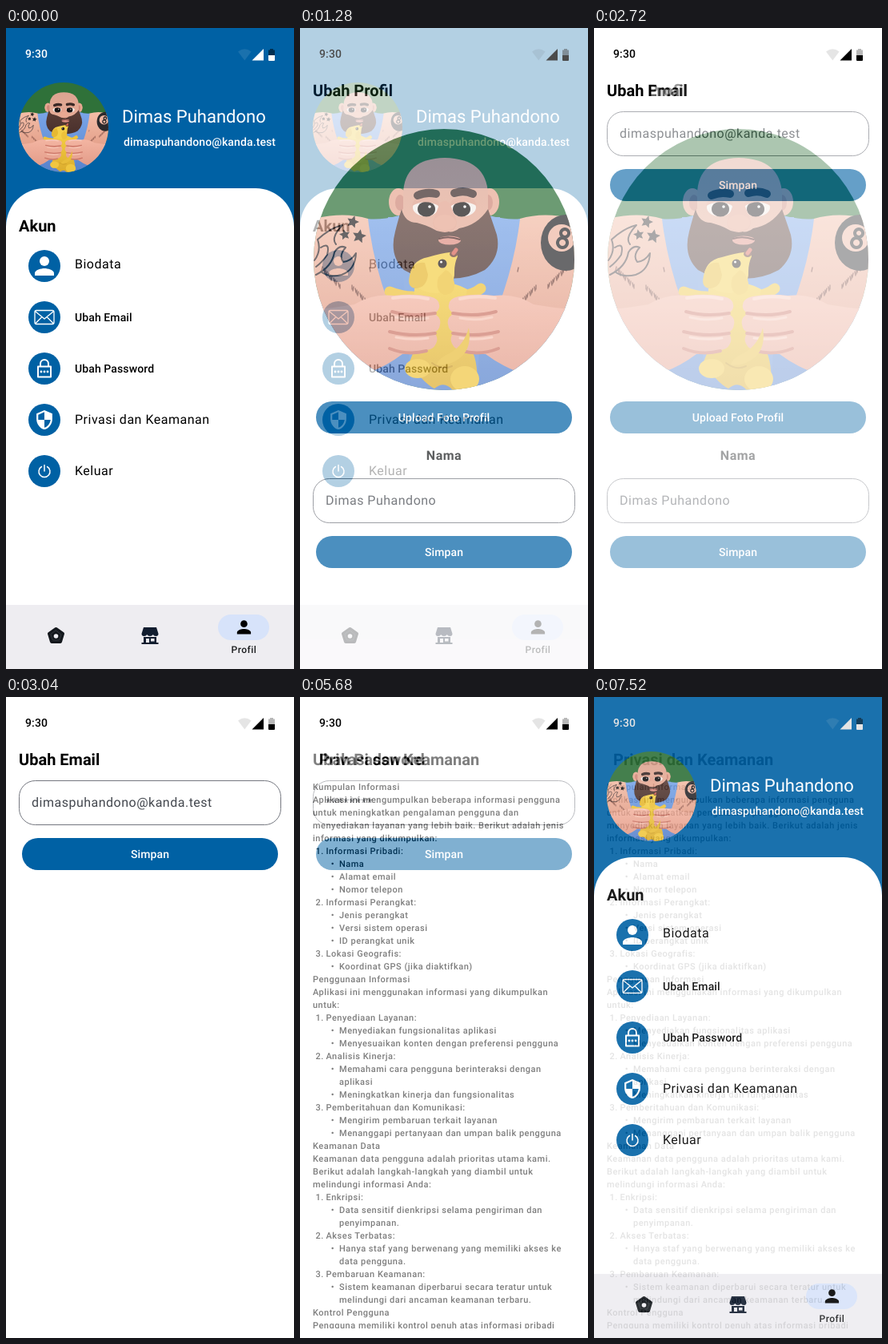
These frames come from a looping animation (360x800 px, 7.6 s). An HTML page:

```html
<!DOCTYPE html>
<html lang="id">
<head>
<meta charset="utf-8">
<title>Profil</title>
<style>
html, body { margin: 0; width: 100%; height: 100%; overflow: hidden; background: #fff; }
svg { display: block; font-family: Roboto, sans-serif; text-rendering: geometricPrecision; }
</style>
</head>
<body>
<svg id="stage" width="360" height="800" viewBox="0 0 360 800"></svg>
<script>
const BLUE = '#0061a4', INK = '#1a1c1e', HOLD = 800, STEP = 80, PERIOD = 1520;
const NAME = 'Dimas Puhandono', EMAIL = 'dimaspuhandono@kanda.test';

const text = (x, y, s, size, weight = 400, gap = 0, fill = '#000', anchor = 'start') =>
  `<text x="${x}" y="${y}" font-size="${size}" font-weight="${weight}" letter-spacing="${gap}" fill="${fill}" text-anchor="${anchor}">${s}</text>`;
const path = (d, fill, extra = '') => `<path d="${d}" fill="${fill}" ${extra}/>`;
const line = (d, color, width, extra = '') =>
  path(d, 'none', `stroke="${color}" stroke-width="${width}" stroke-linecap="round" stroke-linejoin="round" ${extra}`);
const oval = (x, y, rx, ry, fill, extra = '') =>
  `<ellipse cx="${x}" cy="${y}" rx="${rx}" ry="${ry}" fill="${fill}" ${extra}/>`;
const dot = (x, y, r, fill) => oval(x, y, r, r, fill);
const rect = (x, y, w, h, fill, rx = 0, extra = '') =>
  `<rect x="${x}" y="${y}" width="${w}" height="${h}" rx="${rx}" fill="${fill}" ${extra}/>`;
const group = (attrs, body) => `<g ${attrs}>${body}</g>`;
const range = (n, f) => Array.from({ length: n }, (_, i) => f(i)).join('');
const mirror = body => body + group('transform="translate(360 0) scale(-1 1)"', body);

const title = (x, s) => text(x, 85, s, 20, 700);
const button = (y, s) => rect(20, y, 320, 40, BLUE, 20) + text(180, y + 25, s, 14, 500, .1, '#fff', 'middle');
const field = (y, s) => rect(16.5, y + .5, 327, 55, '#fff', 20, 'stroke="#74777f"') + text(32, y + 33, s, 16, 400, .5, '#43474e');

const statusBar = (color, cap) => text(24, 37, '9:30', 14, 500, .14, color) +
  path('M298.3 40.5L290 29.6Q298.3 23 306.6 29.6Z', color, 'opacity=".1"') +
  path('M307.5 40.5L322 26V40.5Z', color) +
  path('M330 26h4v1.5h2v6.5h-8v-6.5h2z', cap) +
  path('M328 34h8v6q0 1-1 1h-6q-1 0-1-1z', color);

const person = fill => dot(12, 8, 4, fill) + path('M12 14c-2.67 0-8 1.34-8 4v2h16v-2c0-2.66-5.33-4-8-4z', fill);

function star(x, y, r, turn) {
  const pts = range(10, i => {
    const a = turn + i * Math.PI / 5, q = i % 2 ? r * .48 : r;
    return `${x + q * Math.sin(a)},${y - q * Math.cos(a)} `;
  });
  return `<polygon points="${pts}" fill="#2b2627"/>`;
}

function portrait() {
  const hand = path('M10 352Q40 350 68 345Q90 331 118 334Q140 331 162 335Q176 338 174 349Q173 354 167 356Q177 361 175 370Q174 378 167 380Q174 386 170 394Q166 403 154 402Q142 407 128 407Q108 422 88 429Q60 432 10 400Z', 'url(#hand)') +
    line('M116 337Q140 333 160 338', '#f9cbbc', 4) +
    line('M169 356Q140 361 115 354M169 381Q140 386 112 379M158 403Q134 409 112 400', '#cc7768', 4) +
    line('M160 362Q140 366 120 361M160 387Q140 390 120 386', '#f7c6b6', 3);
  const shoulder = path('M10 240Q52 228 85 238Q91 290 110 342L60 354L10 354Z', 'url(#skin)');
  const strap = path('M84 238Q101 240 124 234L140 460H78Q92 370 84 238Z', 'url(#denim)');
  const hairs = line(range(24, i => `M${28 + i * 37 % 72} ${298 + i * 23 % 44}l${i % 3 - 1} 5`), '#7a4a40', 1.3);
  const ear = oval(123, 217, 12, 17, '#e7a892') + oval(125, 218, 6, 10, '#cf8878');
  const body = rect(10, 340, 340, 120, 'url(#denim)') + rect(110, 236, 140, 150, '#6f99dc') +
    mirror(strap + shoulder + hairs) +
    line('M18 290Q27 278 22 264Q37 250 53 246Q38 262 45 270M20 308Q40 298 43 280Q49 270 57 274Q48 284 54 292Q64 291 70 281Q69 302 52 308Q36 312 26 304M26 274Q38 266 34 283Q28 292 20 298', '#393033', 2) +
    star(66, 242, 8, .3) + star(56, 258, 7, -.2) + star(74, 260, 9, .2) +
    oval(332, 268, 31, 35, '#2b2a2d') + dot(327, 262, 17, '#efb7a3') +
    line('M331 251a5 5 0 1 0 .1 0M328 262a6 6 0 1 0 .1 0', '#2b2a2d', 4);
  const head = mirror(ear) +
    path('M129 240V207Q130 163 181 162Q233 163 235 207V240Q231 280 182 280Q132 280 129 240Z', 'url(#face)') +
    path('M127 226Q131 243 146 243Q158 246 167 251Q174 256 182 253Q190 257 199 250Q222 246 235 226Q240 240 246 258Q252 284 231 302Q209 314 182 313Q151 315 130 302Q111 284 119 254Q123 238 127 226Z', 'url(#beard)') +
    oval(157, 224, 16, 11, '#f5eeea') + oval(204, 224, 16, 11, '#f5eeea') +
    oval(158, 226, 11, 9.5, '#161314') + oval(202, 226, 11, 9.5, '#161314') +
    path('M140 222Q142 209 158 211Q174 211 175 223Q158 212 140 222ZM187 223Q188 211 204 211Q219 210 221 222Q204 212 187 223Z', '#dfa08c') +
    dot(162, 223, 1.8, '#fff') + dot(206, 223, 1.8, '#fff') +
    line('M147 209Q158 204 170 207M193 206Q205 202 216 207', '#3b2927', 10) +
    path('M175 218Q181 214 187 218L195 238Q198 251 188 253Q181 257 174 253Q164 251 167 239Z', '#e3a38f') +
    oval(181, 243, 14, 10, '#e8a993') + oval(187, 265, 14, 5.5, '#df8f83') +
    line('M174 263Q186 259 200 264', '#4b2926', 2);
  const dog = line('M141 335Q126 335 112 329M201 335Q218 332 226 325', '#eec33a', 13) +
    path('M143 325Q178 309 209 326Q202 362 207 389Q226 412 220 456H194Q182 438 168 450Q160 446 151 436Q134 437 132 425Q149 400 141 370Z', 'url(#dog)') +
    path('M137 313Q138 290 160 286Q177 281 187 280Q195 278 197 285Q193 294 193 304Q194 323 172 331Q148 331 137 313Z', '#f4cf48') +
    path('M156 293Q142 291 138 306Q132 324 145 325Q158 324 160 308Z', '#e7b932') +
    path('M173 311Q168 328 180 333Q194 333 193 318Q190 304 182 302Z', '#edc23b') +
    dot(178, 294, 5.5, '#211919') + dot(176.5, 292, 1.5, '#fff') +
    oval(192, 282, 5, 4, '#693a30') + line('M195 277l-3 4', '#d86558', 5) +
    oval(147, 425, 16, 12, '#f0c640') + oval(206, 438, 18, 16, '#f0c640') +
    line('M165 418Q178 428 190 422', '#c99a28', 2);
  const tail = path('M211 374Q205 396 187 406Q173 412 171 420Q186 423 201 411Q215 399 211 374Z', '#e9bd3a');
  return `<defs>
    <clipPath id="disc"><circle cx="180" cy="289" r="163"/></clipPath>
    <clipPath id="page"><rect width="360" height="788"/></clipPath>` +
    [['skin', '#f3bda7', '#e4a18b'], ['hand', '#f3b5a2', '#e39c89'], ['face', '#dca491', '#e9ae98'],
     ['beard', '#5b3e37', '#49302c'], ['dog', '#f3cd43', '#dbab2d'], ['denim', '#79a5e8', '#5681cb']]
      .map(([id, a, b]) => `<linearGradient id="${id}" x2="0" y2="1"><stop stop-color="${a}"/><stop offset="1" stop-color="${b}"/></linearGradient>`).join('') +
    `<g id="portrait" clip-path="url(#disc)">${rect(10, 120, 340, 340, '#2f7139') + body + head + dog + mirror(hand) + tail}</g></defs>`;
}

function account() {
  const items = [['Biodata', 300], ['Ubah Email', 366], ['Ubah Password', 430], ['Privasi dan Keamanan', 494], ['Keluar', 558]];
  const icons = [
    group('transform="translate(30 279) scale(1.5)"', person('#fff')),
    line('M38 352.5h20q2 0 2 2v13q0 2-2 2H38q-2 0-2-2v-13q0-2 2-2zM37 354l11 9 11-9M37 368.5l8-8M59 368.5l-8-8', '#fff', 1.3),
    line('M40 422.5h16v13H40zM43 422v-3a5 5 0 0 1 10 0v3', '#fff', 2) + range(3, i => dot(44 + i * 4, 429, 1.4, '#fff')),
    path('M12 1L3 5v6c0 5.55 3.84 10.74 9 12 5.16-1.26 9-6.45 9-12V5l-9-4zm0 10.99h7c-.53 4.12-3.28 7.79-7 8.94V12H5V6.3l7-3.11v8.8z', '#fff', 'fill-rule="evenodd" transform="translate(34.8 475.8) scale(1.1)"'),
    line('M44.5 547.5a7 7 0 1 0 7 0M48 545.5v7.5', '#fff', 1.5)
  ];
  const menu = items.map(([s, y], i) => dot(48, 297 + i * 64, 20, BLUE) + icons[i] +
    (i == 1 || i == 2 ? text(86, y, s, 14, 500, .1) : text(86, y, s, 16, 400, .5))).join('');
  const home = path('M62.5 750L71 756L68 766H57L54 756Z', '#14181d', 'stroke="#14181d" stroke-width="4" stroke-linejoin="round"') +
    line('M62.5 752L69 757L66.5 764H58.5L56 757Z', '#3b4046', .8) + dot(62.5, 759, 2.8, '#eeedf1');
  const shop = path('M172 748h16l2.5 8q0 3-3 3t-3.7-2q-1 2-3.8 2t-3.8-2q-.7 2-3.7 2t-3-3zM172 760h16v7h2.5v2h-21v-2h2.5zM175 762v5h4v-5zM181 762v3.5h4.5v-3.5z', '#111d2f', 'fill-rule="evenodd"');
  return rect(0, 0, 360, 300, BLUE) + rect(0, 200, 360, 600, '#fff', 48) + statusBar('#fff', 'rgba(0,0,0,.5)') +
    '<use href="#portrait" transform="translate(72 124) scale(.3436) translate(-180 -289)"/>' +
    text(145, 118, NAME, 22, 400, 0, '#fff') + text(147, 147, EMAIL, 14, 500, .1, '#fff') +
    text(16, 254, 'Akun', 20, 700) + menu +
    rect(0, 720, 360, 80, '#eeedf1') + home + shop + rect(265, 732, 64, 32, '#d7e3fa', 16) +
    group('transform="translate(284.5 735) scale(1.08)"', person('#000')) +
    text(297.5, 780, 'Profil', 12, 500, .5, INK, 'middle');
}

// Line prefixes: digit = numbered item, "-" = bullet, "_" = bullet continued.
const POLICY = `Kumpulan Informasi
Aplikasi ini mengumpulkan beberapa informasi pengguna
untuk meningkatkan pengalaman pengguna dan
menyediakan layanan yang lebih baik. Berikut adalah jenis
informasi yang dikumpulkan:
1Informasi Pribadi:
-Nama
-Alamat email
-Nomor telepon
2Informasi Perangkat:
-Jenis perangkat
-Versi sistem operasi
-ID perangkat unik
3Lokasi Geografis:
-Koordinat GPS (jika diaktifkan)
Penggunaan Informasi
Aplikasi ini menggunakan informasi yang dikumpulkan
untuk:
1Penyediaan Layanan:
-Menyediakan fungsionalitas aplikasi
-Menyesuaikan konten dengan preferensi pengguna
2Analisis Kinerja:
-Memahami cara pengguna berinteraksi dengan
_aplikasi
-Meningkatkan kinerja dan fungsionalitas
3Pemberitahuan dan Komunikasi:
-Mengirim pembaruan terkait layanan
-Menanggapi pertanyaan dan umpan balik pengguna
Keamanan Data
Keamanan data pengguna adalah prioritas utama kami.
Berikut adalah langkah-langkah yang diambil untuk
melindungi informasi Anda:
1Enkripsi:
-Data sensitif dienkripsi selama pengiriman dan
_penyimpanan.
2Akses Terbatas:
-Hanya staf yang berwenang yang memiliki akses ke
_data pengguna.
3Pembaruan Keamanan:
-Sistem keamanan diperbarui secara teratur untuk
_melindungi dari ancaman keamanan terbaru.
Kontrol Pengguna
Pengguna memiliki kontrol penuh atas informasi pribadi`;

function policyLine(s, i) {
  const y = 116 + i * 16, put = (x, t) => text(x, y, t, 11, 500, .5);
  const [, mark, rest] = s.match(/^([\d_-]?)(.*)/);
  if (!mark) return put(16, rest);
  if (mark == '-') return put(38.7, '•') + put(49, rest);
  return mark == '_' ? put(49, rest) : put(19.6, mark + '.') + put(32.5, rest);
}

const dark = statusBar('#000', '#b8b8b8');
const screens = [
  account(),
  dark + title(16, 'Ubah Profil') + '<use href="#portrait"/>' + button(466, 'Upload Foto Profil') +
    text(180, 539, 'Nama', 16, 700, .5, INK, 'middle') + field(562, NAME) + button(634, 'Simpan'),
  dark + title(16, 'Ubah Email') + field(104, EMAIL) + button(176, 'Simpan'),
  dark + title(16, 'Ubah Password') + field(104, '********') + button(176, 'Simpan'),
  dark + title(24, 'Privasi dan Keamanan') +
    group('clip-path="url(#page)"', POLICY.split('\n').map(policyLine).join(''))
];

const stage = document.getElementById('stage');
stage.innerHTML = portrait() + screens.map(s => group('class="screen"', rect(0, 0, 360, 800, '#fff') + s)).join('');
const layers = [...stage.querySelectorAll('.screen')];
const start = performance.now();

function draw() {
  const t = Math.max(0, performance.now() - start) % (PERIOD * layers.length);
  const now = Math.floor(t / PERIOD), u = t % PERIOD;
  const mix = u < HOLD ? 0 : (Math.floor((u - HOLD) / STEP) + 1) / 10;
  const last = now == layers.length - 1;
  layers.forEach((layer, i) => {
    // The last screen lies on top, so it fades out over the first.
    const alpha = i == now ? (last ? 1 - mix : 1) : i == now + 1 ? mix : last && i == 0 ? 1 : 0;
    layer.style.opacity = alpha;
    layer.style.display = alpha ? '' : 'none';
  });
  requestAnimationFrame(draw);
}
draw();
</script>
</body>
</html>
```
